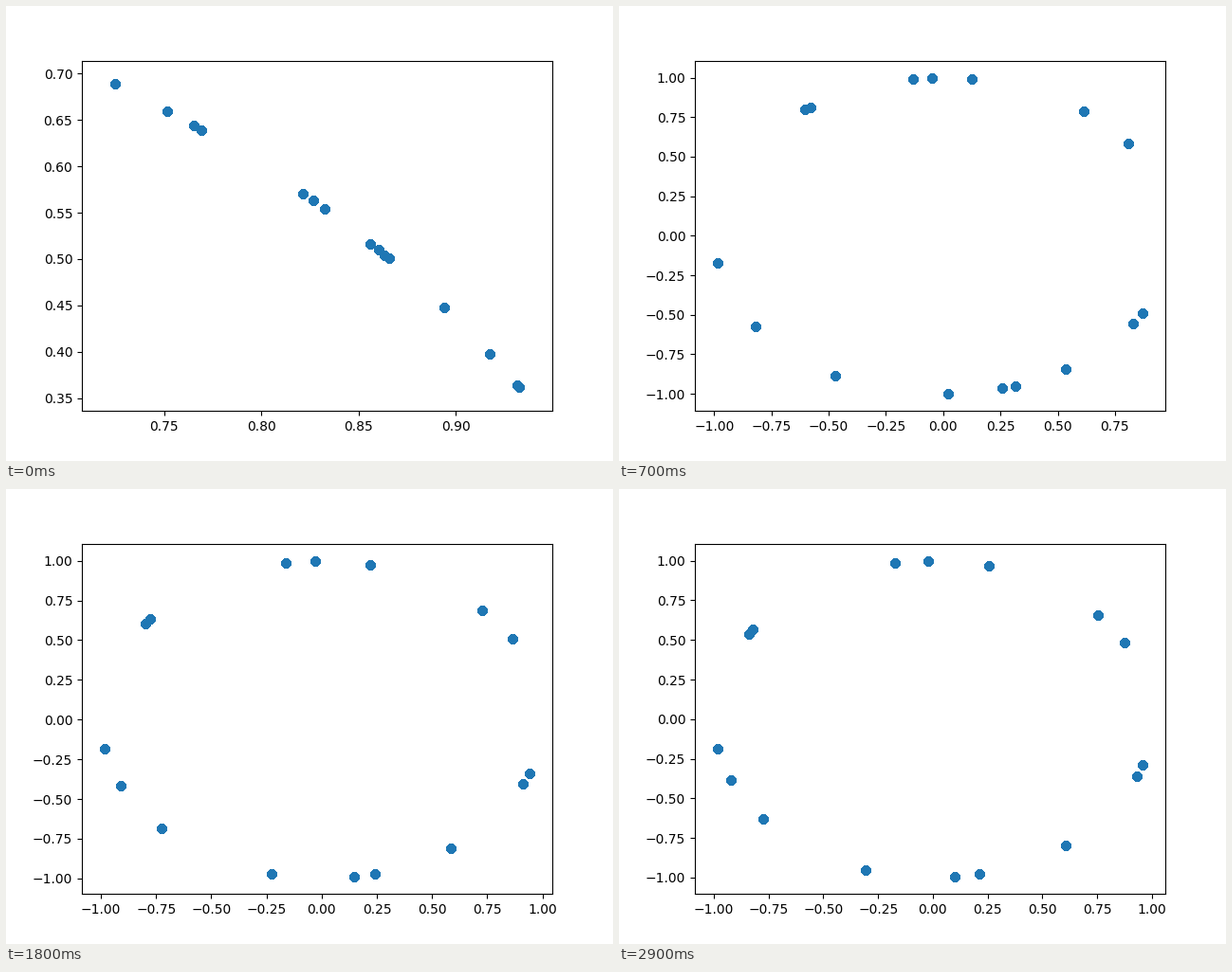
Animation of 640 by 480 pixels, one loop 3000 ms. Source, as a matplotlib script:

```python
import numpy as np
import matplotlib.pyplot as plt
from matplotlib.animation import FuncAnimation

FRAMES = 30
OVERDRAW = 300  # many samples share each position, which hardens the dot edges

# Angles in degrees of the 16 clusters: bunched at first, spread out at last.
START = [21.18, 21.33, 23.45, 26.6, 30.04, 30.04, 30.29, 30.67,
         31.11, 33.66, 34.26, 34.8, 39.72, 40.08, 41.25, 43.54]
REST = [-157.5, -140.9, -108.1, -84.25, -77.7, -52.65, -21, -16.7,
        29, 41.1, 75.2, 91.2, 99.9, 145.4, 147.4, 190.7]
BURST = 2  # frames needed to leave the bunch

fig, ax = plt.subplots(figsize=(6.4, 4.8), dpi=100)
dots = ax.scatter([], [])


def spread_angles(frame):
    """Resting circle, squeezed and sheared by an amount that dies away."""
    q = 1.9 * np.exp(-frame / 11) - 0.13
    c, s = np.cos(np.radians(REST)), np.sin(np.radians(REST))
    x = c * (1 - 0.47 * q) + q * (0.1 - 0.14 * s)
    y = s - 0.12 * q * c
    angle = np.degrees(np.arctan2(y, x))
    return (angle + 165) % 360 - 165  # keeps the clusters in order


def positions(frame):
    u = min(frame / BURST, 1) ** 1.2
    angle = np.array(START) * (1 - u) + spread_angles(max(frame, BURST)) * u
    return np.cos(np.radians(angle)), np.sin(np.radians(angle))


def limits(values, pixels):
    """Data range widened by a 3 px dot radius, plus a 5 % margin."""
    radius = 3 / pixels
    lo, hi = values.min() - radius, values.max() + radius
    margin = 0.05 * (hi - lo)
    return lo - margin, hi + margin


def update(frame):
    x, y = positions(frame)
    dots.set_offsets(np.repeat(np.column_stack([x, y]), OVERDRAW, axis=0))
    ax.set_xlim(limits(x, 496))
    ax.set_ylim(limits(y, 369.6))
    return [dots]


anim = FuncAnimation(fig, update, frames=FRAMES, interval=100,
                     init_func=lambda: update(0), repeat=True, repeat_delay=0)
plt.show()
```
